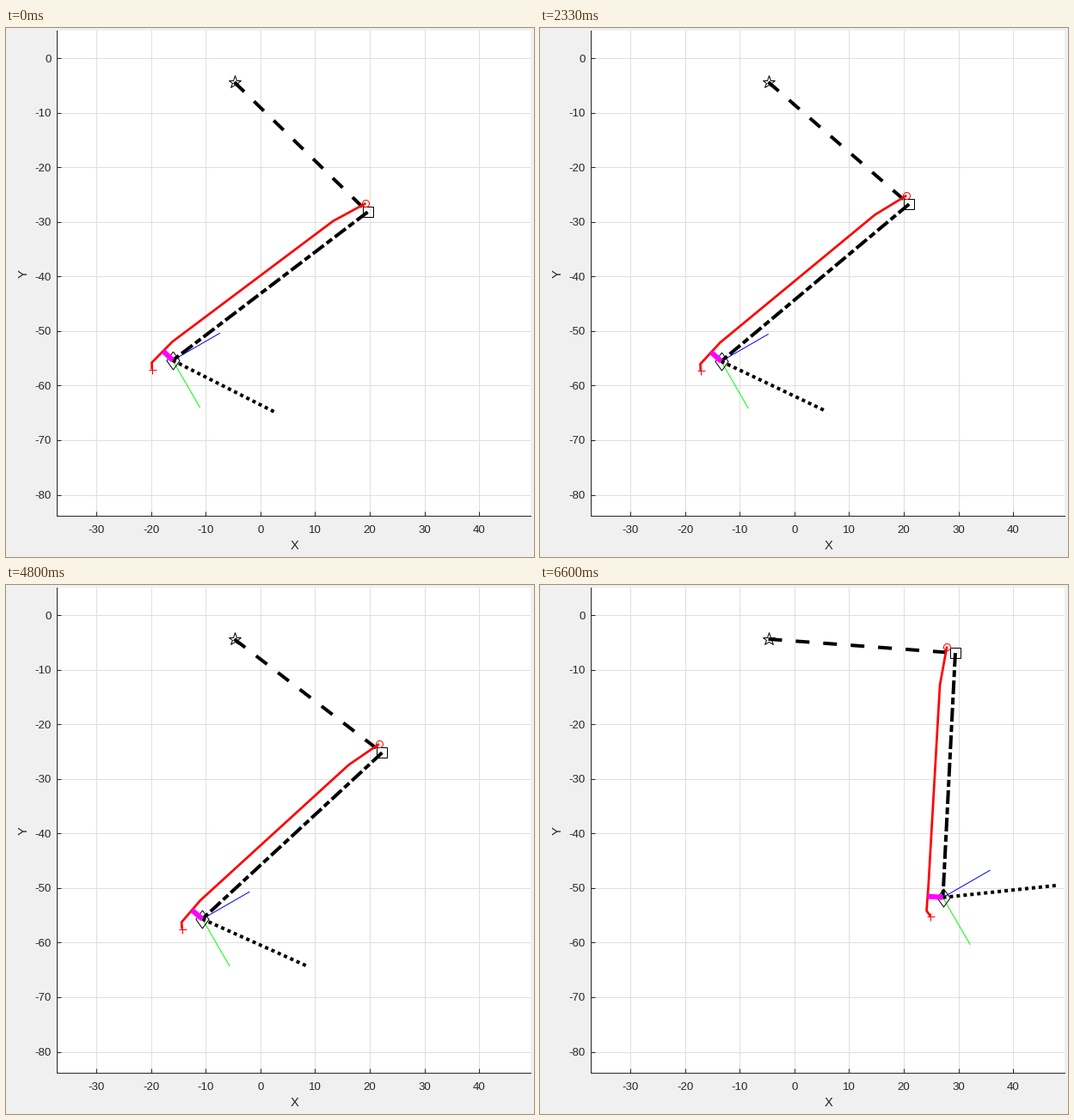
These frames come from a looping animation (614x616 px, 7.07 s). A matplotlib script:

```python
import numpy as np
import matplotlib.pyplot as plt
from matplotlib.animation import FuncAnimation

W, H, DPI = 614, 616, 64
PX = 72 / DPI                       # points per pixel
LEFT, RIGHT, TOP, BOTTOM = 59, 610, 3, 568
X0, Y0, UNIT = 295.85, 35, 6.357    # pixel of the data zero, pixels per unit
INK = "#262626"
LOOP, STEP = 7070, 35

HIP = np.array([265.5, 63])
SHANK, FOOT = 285, 133
PERIOD = 10.145                     # poses per gait cycle
POSES = 28
CLOCK, TICKS_PER_POSE = 15, 3.75    # clock in Hz

# mean angle and harmonics (cos + sin * j), degrees clockwise from +x
THIGH_WAVE = 31.4, 14.9 + 28.0j, -2.8 + 4.0j, 0.2 - 0.1j, 0.6 + 0.2j
SHANK_WAVE = 130.8, 7.0 + 33.3j, 3.6 - 4.8j, 1.1 - 0.3j, 0.2 + 1.3j
FOOT_WAVE = 24.3, 13.3 + 29.0j, -11.7 - 3.9j, 0.8 - 3.8j, 0.2 + 1.8j


def wave(coeffs, turn):
    k = np.arange(len(coeffs))
    return np.sum(np.array(coeffs) * np.exp(-2j * np.pi * k * turn)).real


def pose_at(ms):
    """Index of the pose held at a time; changes wait for a clock tick."""
    tick = int(ms * CLOCK / 1000)
    return min(int((tick + 3) / TICKS_PER_POSE), POSES - 1)


def polar(r, deg):
    a = np.radians(deg)
    return r * np.array([np.cos(a), np.sin(a)])


def local(origin, deg, along, side):
    return origin + polar(along, deg) + polar(side, deg + 90)


plt.rcParams["font.family"] = "Liberation Sans"
fig = plt.figure(figsize=(W / DPI, H / DPI), dpi=DPI, facecolor="#f0f0f0")
ax = fig.add_axes([LEFT / W, 1 - BOTTOM / H,
                   (RIGHT - LEFT) / W, (BOTTOM - TOP) / H])
ax.set_xlim(LEFT, RIGHT)
ax.set_ylim(BOTTOM, TOP)
xs, ys = range(-30, 41, 10), range(-80, 1, 10)
ax.set_xticks([X0 + UNIT * v for v in xs], [str(v) for v in xs])
ax.set_yticks([Y0 - UNIT * v for v in ys], [str(v) for v in ys])
ax.tick_params(direction="in", length=5 * PX, width=PX, color=INK,
               labelcolor=INK, labelsize=13.3 * PX)
ax.tick_params(axis="x", pad=10.5 * PX)
ax.tick_params(axis="y", pad=6 * PX)
ax.grid(True, color="#dfdfdf", lw=PX)
ax.set_axisbelow(True)
ax.spines[["top", "right"]].set_visible(False)
for side in ("left", "bottom"):
    ax.spines[side].set(color=INK, linewidth=PX)
for x, y, text, turn in ((335.5, 602.5, "X", 0), (21, 286.5, "Y", 90)):
    ax.text(x, y, text, rotation=turn, ha="center", va="center",
            size=14.7 * PX, color=INK)


def line(color, width, z, style="-"):
    return ax.plot([], [], color=color, lw=width * PX, ls=style, zorder=z,
                   dash_capstyle="butt", solid_capstyle="butt",
                   solid_joinstyle="round")[0]


def marker(shape, size, color, z):
    return ax.plot([], [], ls="", marker=shape, ms=size * PX, mec=color,
                   mfc="none", mew=PX, zorder=z, clip_on=False)[0]


DIAMOND = np.array([(0, 1), (-0.72, 0), (0, -1), (0.72, 0), (0, 1)])

blue = line("#0000ff", 1, 3)
green = line("#00ff00", 1, 3)
thigh = line("black", 4, 4, (0, (4, 4)))
shank = line("black", 4, 4, (0, (4, 1, 2, 1)))
foot = line("black", 4, 4, (0, (1, 1)))
hip_mark = marker("*", 15.5, "black", 5)
knee_mark = marker("s", 12, "black", 5)
ankle_mark = marker(DIAMOND, 21, "black", 5)
muscle = line("#ff0000", 2.7, 6)
origin_mark = marker("o", 8, "#ff0000", 6)
insert_mark = marker("+", 9, "#ff0000", 6)
arm = line("#ff00ff", 6, 7)


def put(artist, *points):
    artist.set_data(*np.transpose(points))


def update(n):
    turn = pose_at((n + 1) * STEP) / PERIOD
    a, b, c = (wave(w, turn) for w in (THIGH_WAVE, SHANK_WAVE, FOOT_WAVE))
    knee = HIP + polar(218.2 - 0.035 * a, a)
    ankle = knee + polar(SHANK, b)

    start = knee + polar(12.6 - 0.05 * a, a - 146.5)
    upper = local(knee, b, 38.2, 16)
    lower = local(ankle, b, -13, 17.5)
    heel = local(ankle, c, -20.5, 13.3)
    end = local(ankle, c, -16.7, 20.3)

    # moment arm: perpendicular from the ankle to the muscle line
    d = heel - lower
    near = lower + d * np.dot(ankle - lower, d) / np.dot(d, d)

    put(thigh, HIP, knee)
    put(shank, knee, ankle)
    put(foot, ankle, ankle + polar(FOOT, c))
    put(blue, ankle, ankle + polar(10 * UNIT, -30))
    put(green, ankle, ankle + polar(10 * UNIT, 60))
    put(muscle, start, upper, lower, heel, end)
    put(arm, ankle, near)
    put(hip_mark, HIP)
    put(knee_mark, knee)
    put(ankle_mark, ankle)
    put(origin_mark, start)
    put(insert_mark, end)
    return ()


anim = FuncAnimation(fig, update, frames=LOOP // STEP, interval=STEP,
                     repeat=True, repeat_delay=0, blit=False)
plt.show()
```
